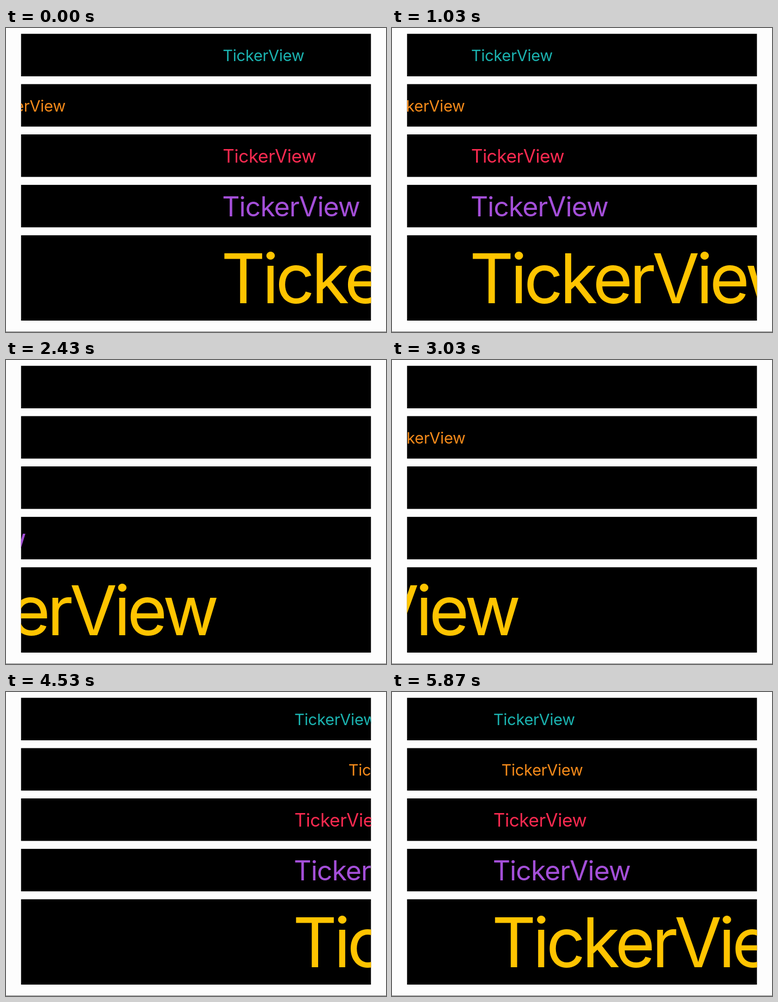
Recreate the animation shown at these times as an HTML page. Size 700x560 px, loop 5.91 s.

```html
<!DOCTYPE html>
<html lang="en">
<head>
<meta charset="utf-8">
<title>Tickers</title>
<style>
  html, body { margin: 0; width: 100%; height: 100%; overflow: hidden; background: #fdfdfd; }
  svg { display: block; }
  text { font-family: Inter, Roboto, sans-serif; font-optical-sizing: none; white-space: pre; }
</style>
</head>
<body>
<svg id="stage" width="700" height="560" viewBox="0 0 700 560"></svg>
<script>
const LOOP = 5910;
const LEFT = 27.5, WIDTH = 645, TRAVEL = 2 * WIDTH;
const TOP = 10.4, PITCH = 92.8;
const SLOW = 0.2584, FAST = 1.2895; // px per ms

// start: left edge of the text at time 0
const rows = [
  { height: 78.6, base: 61, size: 29, track: -0.008, color: '#1bb3b0', start: 399.3, speed: SLOW },
  { height: 78.6, base: 154, size: 29, track: -0.008, color: '#f48a1a', start: -40.5, speed: FAST },
  { height: 78.6, base: 248, size: 33.3, track: -0.01, color: '#fa2a50', start: 399.3, speed: SLOW },
  { height: 78.6, base: 347.5, size: 50, track: -0.019, color: '#a44fd8', start: 398.3, speed: SLOW },
  { height: 157.4, base: 507, size: 126.5, track: -0.0475, color: '#ffc400', start: 396.3, speed: SLOW },
];

const stage = document.getElementById('stage');

function add(parent, tag, attrs) {
  const node = document.createElementNS('http://www.w3.org/2000/svg', tag);
  for (const key in attrs) node.setAttribute(key, attrs[key]);
  return parent.appendChild(node);
}

rows.forEach((row, i) => {
  const top = TOP + PITCH * i;
  const box = add(stage, 'svg', { x: LEFT, y: top, width: WIDTH, height: row.height, overflow: 'hidden' });
  add(box, 'rect', { width: WIDTH, height: row.height });
  row.label = add(box, 'text', {
    y: row.base - top, fill: row.color,
    'font-size': row.size, 'letter-spacing': row.track * row.size,
  });
  row.label.textContent = 'TickerView';
});
add(stage, 'rect', { y: 559, width: 700, height: 1, fill: '#808080' });

// 30 steps per second, with one short stall near the start
function tickerTime(ms) {
  const rest = ms % 100;
  const step = Math.floor(ms / 100) * 3 + (rest >= 70 ? 2 : rest >= 30 ? 1 : 0);
  const time = step * 100 / 3;
  return step < 11 ? Math.min(time, 700 / 3) : time - 52;
}

function wrap(x) {
  return ((x + WIDTH) % TRAVEL + TRAVEL) % TRAVEL - WIDTH;
}

function draw() {
  const time = tickerTime(performance.now() % LOOP);
  for (const row of rows) {
    row.label.setAttribute('x', wrap(row.start - LEFT - row.speed * time));
  }
  requestAnimationFrame(draw);
}
draw();
</script>
</body>
</html>
```
